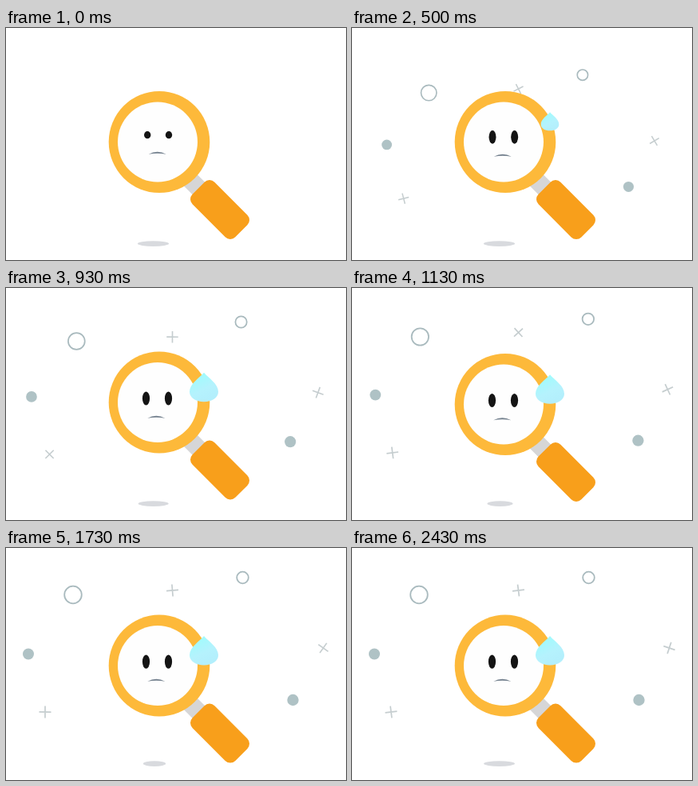
An HTML page with a canvas that plays this animation: 426x290 px, repeating every 2.46 s.

```html
<!DOCTYPE html>
<html lang="en">
<head>
<meta charset="utf-8">
<title>Worried magnifier</title>
<style>
  html, body { margin: 0; width: 100%; height: 100%; overflow: hidden; background: #fff; }
  canvas { display: block; }
</style>
</head>
<body>
<canvas id="stage" width="426" height="290"></canvas>
<script>
const ctx = document.getElementById('stage').getContext('2d');
const LOOP = 2460;
const BOB = LOOP / 5;
const BOB_END = BOB * 4.5;
const ORIGIN = { x: 208.5, y: 288 };

// Keys are [time, value] pairs.
const CROSS_BURST = [[20, 0], [170, 1.1], [300, 1.021], [520, 0.9], [730, 0.914], [930, 0.965], [1330, 1]];
const DOT_BURST = [[20, 0], [140, 1.095], [300, 0.95], [440, 0.91], [730, 0.954], [930, 0.978], [1330, 1]];

const CROSSES = [
  { x: 208.5, y: 53, spin: [[0, -70], [300, 0], [730, 135], [930, 180], [1330, 275], [1730, 355], [2460, 540]] },
  { x: 397.5, y: 125, spin: [[0, -30], [300, 30], [730, 92], [930, 110], [1330, 200], [1730, 305], [2460, 475]] },
  { x: 49, y: 205, spin: [[0, -20], [300, 45], [730, 110], [930, 135], [1330, 210], [1730, 270], [2460, 450]] }
];

const clamp = v => Math.min(1, Math.max(0, v));
const smooth = (t, from, to) => {
  const p = clamp((t - from) / (to - from));
  return p * p * (3 - 2 * p);
};
const mix = (a, b, p) => a + (b - a) * p;

// Hermite interpolation, flat at extremes and at the last key.
function curve(keys, t) {
  const last = keys.length - 1;
  if (t <= keys[0][0]) return keys[0][1];
  if (t >= keys[last][0]) return keys[last][1];
  const slope = i => (keys[i + 1][1] - keys[i][1]) / (keys[i + 1][0] - keys[i][0]);
  const tangent = i => {
    if (i === 0) return slope(0) * 2;
    if (i === last) return 0;
    const a = slope(i - 1), b = slope(i);
    return a * b <= 0 ? 0 : 2 * a * b / (a + b);
  };
  const i = keys.findIndex(k => k[0] > t) - 1;
  const span = keys[i + 1][0] - keys[i][0];
  const p = (t - keys[i][0]) / span, q = 1 - p;
  return keys[i][1] * (1 + 2 * p) * q * q + tangent(i) * span * p * q * q
    + keys[i + 1][1] * p * p * (3 - 2 * p) - tangent(i + 1) * span * p * p * q;
}

function linear(keys, t) {
  const i = Math.max(1, keys.findIndex(k => k[0] >= t));
  const [t0, a] = keys[i - 1], [t1, b] = keys[i];
  return mix(a, b, (t - t0) / (t1 - t0));
}

function ellipse(x, y, rx, ry, fill) {
  ctx.beginPath();
  ctx.ellipse(x, y, rx, ry, 0, 0, Math.PI * 2);
  ctx.fillStyle = fill;
  ctx.fill();
}

function ring(x, y, r) {
  ctx.beginPath();
  ctx.arc(x, y, r, 0, Math.PI * 2);
  ctx.strokeStyle = '#a9babe';
  ctx.lineWidth = 1.8;
  ctx.stroke();
}

function cross(x, y, degrees) {
  ctx.save();
  ctx.translate(x, y);
  ctx.rotate(degrees * Math.PI / 180);
  ctx.beginPath();
  ctx.moveTo(-7.5, 0);
  ctx.lineTo(7.5, 0);
  ctx.moveTo(0, -7.5);
  ctx.lineTo(0, 7.5);
  ctx.strokeStyle = '#c5cdcf';
  ctx.lineWidth = 1.7;
  ctx.stroke();
  ctx.restore();
}

function burst(scale, draw) {
  if (scale <= 0) return;
  ctx.save();
  ctx.translate(ORIGIN.x, ORIGIN.y);
  ctx.scale(scale, scale);
  ctx.translate(-ORIGIN.x, -ORIGIN.y);
  draw();
  ctx.restore();
}

function particles(t) {
  burst(curve(CROSS_BURST, t), () => {
    ring(84, 58.5, 10.8);
    CROSSES.forEach(c => cross(c.x, c.y, linear(c.spin, t)));
  });
  burst(curve(DOT_BURST, t), () => {
    ring(296.5, 37, 7.3);
    ellipse(28, 132.5, 7, 7, '#afc2c5');
    ellipse(359.5, 190, 7.2, 7.2, '#afc2c5');
  });
}

function handle() {
  ctx.save();
  ctx.translate(268, 227);
  ctx.rotate(Math.PI / 4);
  ctx.fillStyle = '#d6d6d7';
  ctx.fillRect(-62, -11, 32, 22);
  ctx.beginPath();
  ctx.roundRect(-38, -19.6, 76, 39.2, 9);
  ctx.fillStyle = '#f89f1b';
  ctx.fill();
  ctx.restore();
}

function face(t) {
  const worry = smooth(t, 330, 600);
  const open = smooth(t, -100, 180);
  const eyeY = mix(133.7, 137.5, worry);
  const rx = mix(4.2, 4.6, worry);
  const ry = mix(3.2, mix(8, 8.6, worry), open);
  ellipse(mix(177.2, 175.5, worry), eyeY, rx, ry, '#141414');
  ellipse(mix(204, 203.5, worry), eyeY, rx, ry, '#141414');

  const x = mix(189.7, 188.3, worry), y = mix(157.7, 162.2, worry);
  ctx.beginPath();
  ctx.moveTo(x - 11, y);
  ctx.quadraticCurveTo(x, y - 6, x + 11, y);
  ctx.quadraticCurveTo(x, y - 2, x - 11, y);
  ctx.fillStyle = '#75828f';
  ctx.fill();
}

function drop(t) {
  const grow = smooth(t, 360, 600);
  if (!grow) return;
  ctx.save();
  ctx.translate(248, 105.3);
  ctx.scale(grow, grow);
  const tint = ctx.createLinearGradient(-8, 4, 6, 32);
  tint.addColorStop(0, '#a0fbfd');
  tint.addColorStop(0.6, '#b5f2fd');
  tint.addColorStop(1, '#b3effc');
  ctx.beginPath();
  ctx.moveTo(0, 0);
  ctx.bezierCurveTo(6, 7, 18, 14, 18, 24);
  ctx.bezierCurveTo(18, 31.5, 10, 36.5, 0, 36.5);
  ctx.bezierCurveTo(-10, 36.5, -18, 31.5, -18, 24);
  ctx.bezierCurveTo(-18, 14, -6, 7, 0, 0);
  ctx.fillStyle = tint;
  ctx.fill();
  ctx.restore();
}

function render(t) {
  const sink = time => (1 - Math.cos(time / BOB * Math.PI * 2)) / 2;
  const shade = sink(t);
  ctx.fillStyle = '#fff';
  ctx.fillRect(0, 0, 426, 290);
  particles(t);
  ellipse(mix(184.5, 186, shade), 269.6, mix(19.7, 14.2, shade), 3.3, '#d8dade');

  ctx.save();
  ctx.translate(0, 4.6 * sink(Math.min(t, BOB_END)));
  handle();
  ellipse(192, 142.5, 63.3, 63.5, '#fdb93a');
  ellipse(190, 142.5, 50, 50, '#fefefe');
  face(t);
  drop(t);
  ctx.restore();
}

const start = performance.now();
function tick() {
  render((performance.now() - start) % LOOP);
  requestAnimationFrame(tick);
}
tick();
</script>
</body>
</html>
```
